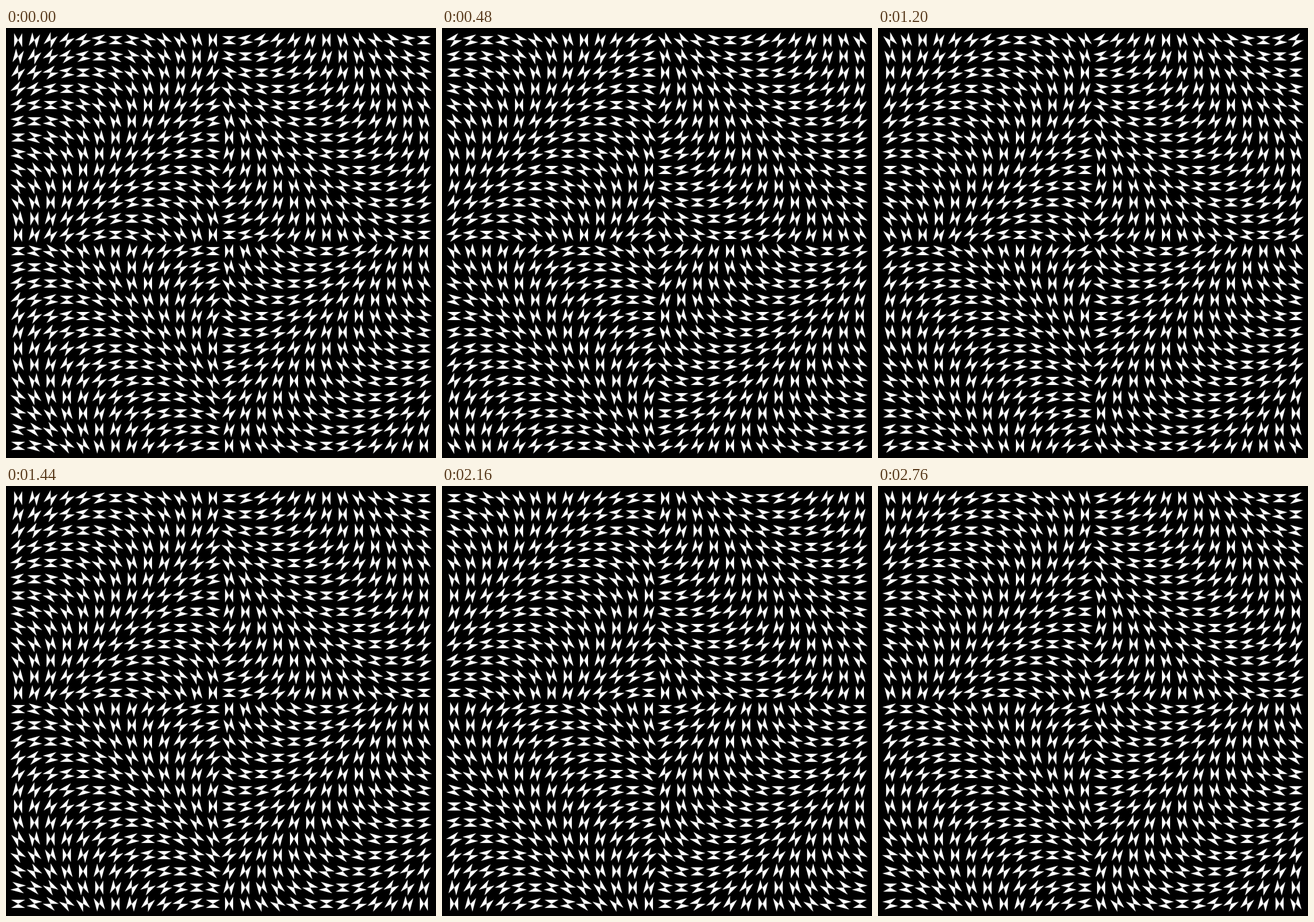
An HTML page for the animation above (2880 ms loop, 748 by 748 pixels).

```html
<!DOCTYPE html>
<html lang="en">
<head>
<meta charset="utf-8">
<title>Turning bow ties</title>
<style>
  html, body { margin: 0; width: 100%; height: 100%; overflow: hidden; background: #000; }
  svg { display: block; width: 748px; height: 748px; }
  path {
    fill: #fff;
    animation: turn 1440ms steps(12) infinite;
  }
  @keyframes turn {
    from { transform: rotate(var(--a)); }
    to { transform: rotate(calc(var(--a) + 180deg)); }
  }
</style>
</head>
<body>
<svg viewBox="0 0 748 748"></svg>
<script>
  const NS = "http://www.w3.org/2000/svg";
  const COUNT = 26, STEP = 15;
  const cell = 748 / (COUNT + 0.5);
  const radius = cell / 2;
  const h = radius * Math.cos(Math.PI / 6);
  const w = radius / 2;
  const bowTie = `M${-w} ${-h}L${w} ${h}V${-h}L${-w} ${h}Z`;
  const svg = document.querySelector("svg");

  function add(parent, tag, attrs) {
    const el = document.createElementNS(NS, tag);
    for (const key in attrs) el.setAttribute(key, attrs[key]);
    return parent.appendChild(el);
  }

  for (let row = 0; row < COUNT; row++) {
    for (let col = 0; col < COUNT; col++) {
      // Offsets from the centre; two opposite quadrants are a quarter turn ahead.
      const dx = col - (COUNT - 1) / 2, dy = row - (COUNT - 1) / 2;
      const lead = dx * dy > 0 ? 1 : 7;
      const angle = STEP * (lead - Math.abs(dx) - Math.abs(dy));
      const spot = add(svg, "g", { transform: `translate(${374 + dx * cell} ${374 + dy * cell})` });
      add(spot, "path", { d: bowTie, style: `--a:${angle}deg` });
    }
  }
</script>
</body>
</html>
```
